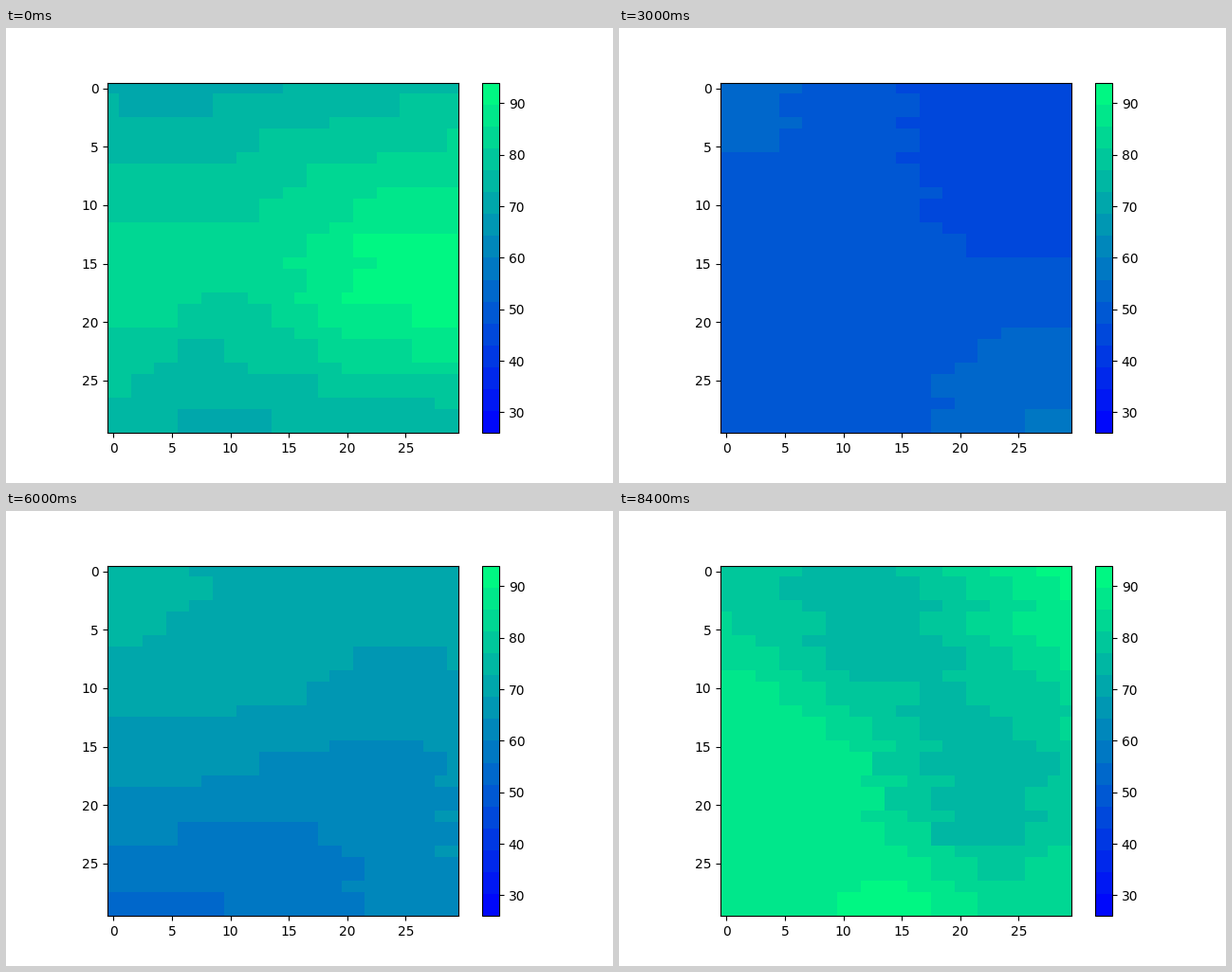
Animation of 640x480 px, one loop 8.6 s. Source, as a matplotlib script:

```python
import numpy as np
import matplotlib.pyplot as plt
from matplotlib.animation import FuncAnimation
from matplotlib.colors import ListedColormap

SIZE, STEPS, BANDS = 30, 43, 16
VMIN, VMAX = 26, 94

# Staggered brick cells: one-row and two-row courses alternate,
# and the lower part is shifted by one column.
row, col = np.mgrid[:SIZE, :SIZE]
single = row % 3 == 0
shift = np.where(single, 1, 3) - (row >= 18)
cell_x = 4 * ((col + shift) // 4) + 1.5 - shift
cell_y = np.where(single, row, row // 3 * 3 + 1.5)


def kernel(dx, dy):
    r2 = dx**2 + dy**2
    return r2 * np.log(r2 + 1e-9)


def surface(*points):
    """Thin-plate surface through key points (x, y, band), one value per cell."""
    x, y, band = np.array(points, float).T
    n = len(x)
    plane = np.column_stack([np.ones(n), x, y])
    bend = kernel(x[:, None] - x, y[:, None] - y)
    system = np.block([[bend, plane], [plane.T, np.zeros((3, 3))]])
    w = np.linalg.solve(system, np.append(band, np.zeros(3)))
    curve = kernel(cell_x[..., None] - x, cell_y[..., None] - y) @ w[:n]
    return curve + w[n] + w[n + 1] * cell_x + w[n + 2] * cell_y


weather = {
    0: surface((2, 1, 10.3), (27, 1, 11.5), (14, 8, 12.2), (2, 18, 13),
               (21, 18, 14.5), (28, 20, 14.6), (6, 23, 11.2), (3, 28, 10.8),
               (26, 28, 11)),
    4: surface((2, 1, 12), (27, 5, 13.2), (15, 11, 12), (3, 11, 11.4),
               (4, 19, 10), (27, 18, 11.5), (2, 28, 9.6), (24, 28, 11.3)),
    11: surface((2, 3, 3.8), (12, 5, 3), (20, 2, 1.2), (28, 1, 2.2),
                (4, 13, 1.5), (14, 14, 2.5), (27, 11, 1.3), (8, 25, 1.3),
                (24, 26, 3.5)),
    20: surface((2, 5, 8.2), (16, 1, 7.1), (27, 4, 6.2), (19, 9, 7.3),
                (3, 12, 9), (24, 14, 7.8), (4, 27, 10), (14, 27, 8.4),
                (26, 25, 9.6)),
    26: surface((2, 2, 14.3), (14, 1, 13.7), (27, 3, 13), (3, 10, 14.6),
                (24, 11, 12), (4, 18, 12.7), (20, 19, 9.9), (6, 26, 9.6),
                (27, 26, 11.3)),
    34: surface((2, 2, 7.3), (15, 2, 6), (27, 3, 7.2), (14, 8, 6.9),
                (2, 11, 5.2), (27, 13, 5.4), (14, 16, 6), (9, 26, 4.1),
                (24, 23, 5.6)),
    42: surface((3, 2, 12), (28, 1, 14.7), (11, 6, 11), (2, 10, 13.6),
                (27, 12, 12), (10, 17, 14), (20, 22, 11.2), (6, 28, 13.8),
                (15, 28, 14.8), (27, 27, 13)),
}
times = list(weather)


def temperature(step):
    """Blend neighbouring surfaces and round to whole bands."""
    i = min(np.searchsorted(times, step, side="right"), len(times) - 1)
    a, b = times[i - 1], times[i]
    t = (step - a) / (b - a)
    band = np.rint((1 - t) * weather[a] + t * weather[b]).clip(0, BANDS - 1)
    return VMIN + (VMAX - VMIN) * (band + 0.5) / BANDS


green = (np.arange(BANDS) + 0.5) / BANDS
winter = ListedColormap(np.column_stack([0 * green, green, 1 - green / 2]))

fig, ax = plt.subplots(figsize=(6.4, 4.8), dpi=100)
image = ax.imshow(temperature(0), cmap=winter, vmin=VMIN, vmax=VMAX)
fig.colorbar(image)


def update(step):
    image.set_data(temperature(step))
    return [image]


anim = FuncAnimation(fig, update, frames=STEPS, interval=200, repeat=True,
                     repeat_delay=0)
plt.show()
```
